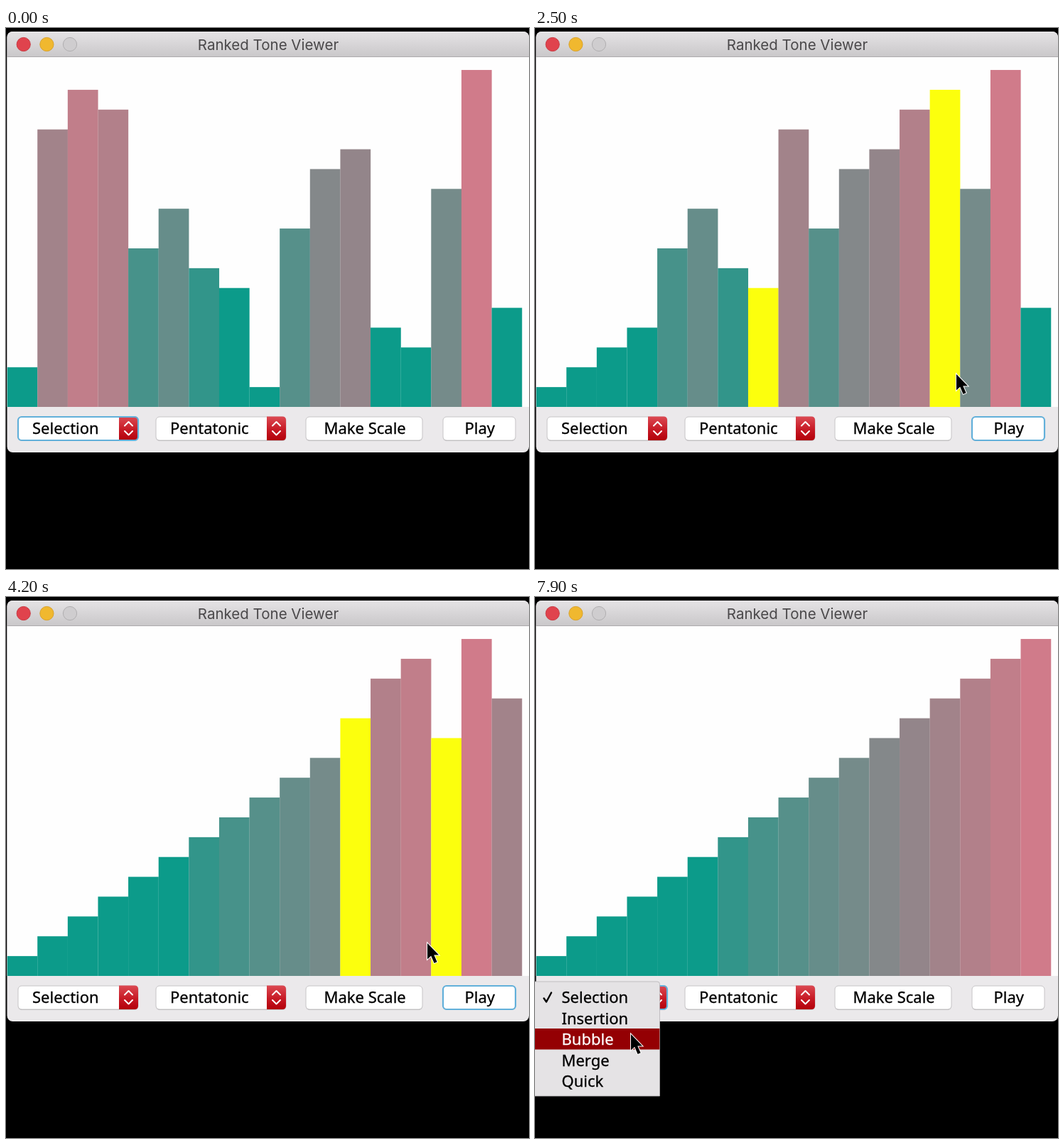
An HTML page that plays this animation: 736 by 761 pixels, repeating every 8000 ms.

```html
<!DOCTYPE html>
<html lang="en">
<head>
<meta charset="utf-8">
<title>Bars</title>
<style>
  html, body { margin: 0; width: 100%; height: 100%; overflow: hidden; background: #000; }
  svg { display: block; width: 736px; height: 761px; }
  text { font-family: "Noto Sans", "Open Sans", sans-serif; font-size: 22px; fill: #000; stroke: #000; stroke-width: .3px; }
  .title { font-family: Inter, Roboto, sans-serif; font-size: 20.5px; fill: #4a484a; stroke: none; text-anchor: middle; }
  .ring { fill: none; stroke: #62b0da; stroke-width: 2.2; }
  .line { fill: none; stroke-linecap: round; stroke-linejoin: round; }
</style>
</head>
<body>
<svg id="stage" viewBox="0 0 736 761">
  <defs>
    <linearGradient id="chrome" x2="0" y2="1">
      <stop stop-color="#e5e3e5"/><stop offset="1" stop-color="#c9c7c9"/>
    </linearGradient>
    <linearGradient id="red" x2="0" y2="1">
      <stop stop-color="#dc4a53"/><stop offset=".55" stop-color="#c71a25"/><stop offset="1" stop-color="#b3000a"/>
    </linearGradient>
    <clipPath id="frame"><rect x="1.5" y="5" width="734.5" height="592" rx="8"/></clipPath>
  </defs>
  <rect width="736" height="761"/>
  <g clip-path="url(#frame)">
    <rect y="5" width="736" height="592" fill="#ebe9eb"/>
    <rect y="5" width="736" height="36" fill="url(#chrome)"/>
    <rect y="40" width="736" height="1.2" fill="#adabad"/>
    <rect y="41" width="736" height="492" fill="#fefefe"/>
    <g id="bars" shape-rendering="geometricPrecision"></g>
  </g>
  <g stroke-width="1">
    <circle cx="24.7" cy="23" r="9.6" fill="#e0434d" stroke="#c93942"/>
    <circle cx="57.4" cy="23" r="9.6" fill="#f0b82f" stroke="#d9a128"/>
    <circle cx="90" cy="23" r="9.6" fill="#cfcdcf" stroke="#b0aeb0"/>
  </g>
  <text class="title" x="369" y="31">Ranked Tone Viewer</text>
  <g id="controls"></g>
  <g id="menu"></g>
  <path id="cursor" d="M0 0V22.5L5.2 17.8L9.6 28L13.6 26.2L9.3 16.4H16Z" fill="#000" stroke="#fff" stroke-width="2" paint-order="stroke" stroke-linejoin="miter"/>
</svg>
<script>
const LOOP = 8000, TICK = 100;
const BASE = 533, UNIT = 27.88, LEFT = 1.6, BAR = 42.62;
const START = [2, 14, 16, 15, 8, 10, 7, 6, 1, 9, 12, 13, 4, 3, 11, 17, 5];
const ITEMS = ["Selection", "Insertion", "Bubble", "Merge", "Quick"];
const ROW = 29.5, MENU_TOP = 548;

// time, x, y; eased between neighbouring points
const PATH = [
  [100, 690, 682], [300, 662, 566], [600, 655, 560], [900, 593, 487],
  [5400, 593, 487], [6200, 139, 552], [6300, 139, 552], [6500, 138, 558],
  [7400, 138, 558], [7900, 135, 615]
];

const byId = id => document.getElementById(id);

function add(parent, tag, attrs, text) {
  const el = document.createElementNS("http://www.w3.org/2000/svg", tag);
  for (const k in attrs) el.setAttribute(k, attrs[k]);
  if (text) el.textContent = text;
  parent.appendChild(el);
  return el;
}

const show = (el, on) => el.setAttribute("visibility", on ? "visible" : "hidden");

function barColor(v) {
  if (v < 7) return "rgb(12,155,138)";
  const red = v === 7 ? 50 : 208 - 15.2 * (17 - v);
  return `rgb(${Math.round(red)},${Math.round(149 - 2.6 * (v - 7))},138)`;
}

// Selection sort: one step per comparison and one per swap
function sortSteps(list) {
  const a = list.slice(), steps = [{ a: a.slice(), hot: [] }];
  const log = (...hot) => steps.push({ a: a.slice(), hot });
  for (let i = 0; i < a.length - 1; i++) {
    let min = i;
    for (let j = i + 1; j < a.length; j++) {
      log(min, j);
      if (a[j] < a[min]) min = j;
    }
    [a[i], a[min]] = [a[min], a[i]];
    log(i, min);
  }
  log();
  return steps;
}

function button(label, x, right, textX, combo) {
  const g = byId("controls"), w = right - x;
  const box = { x, y: 547, width: w, height: 33, rx: 5 };
  add(g, "rect", { ...box, y: 548, fill: "#bfbdbf" });
  add(g, "rect", { ...box, fill: "#fff", stroke: "#c6c4c6", "stroke-width": 1 });
  if (combo) {
    const l = right - 27, m = right - 13.5;
    add(g, "path", { d: `M${l} 546.5H${right - 5}q5 0 5 5V575q0 5-5 5H${l}Z`, fill: "url(#red)" });
    add(g, "path", {
      class: "line", stroke: "#fff", "stroke-width": 2,
      d: `M${m - 5.5} 559.5l5.5-5.5l5.5 5.5M${m - 5.5} 567l5.5 5.5l5.5-5.5`
    });
  }
  add(g, "text", { x: textX, y: 571 }, label);
  return add(g, "rect", { ...box, class: "ring" });
}

const steps = sortSteps(START);
const bars = START.map((v, i) =>
  add(byId("bars"), "rect", { x: LEFT + i * BAR, width: BAR + .1 }));

const sortRing = button("Selection", 17, 186, 37, true);
show(button("Pentatonic", 211, 394, 231, true), false);
show(button("Make Scale", 422, 586, 447.5, false), false);
const playRing = button("Play", 615, 717, 645.5, false);

const menu = byId("menu");
add(menu, "path", { d: "M-1 541H172q3.5 0 3.5 3.5V702H-1Z", fill: "#e5e3e5", stroke: "#b5b3b5", "stroke-width": .8 });
const mark = add(menu, "rect", { x: 0, width: 175.3, height: ROW, fill: "#940003" });
const check = add(menu, "path", { class: "line", d: "M12.5 564.5L16 569.5L23 556.5", "stroke-width": 2.4 });
const labels = ITEMS.map((s, i) => add(menu, "text", { x: 37.5, y: 571 + i * ROW }, s));

function cursorAt(t) {
  const n = PATH.findIndex(p => p[0] > t);
  if (n < 0) return PATH[PATH.length - 1].slice(1);
  const [t0, x0, y0] = PATH[Math.max(n - 1, 0)], [t1, x1, y1] = PATH[n];
  const u = Math.max(0, (t - t0) / (t1 - t0)), e = u * u * (3 - 2 * u);
  return [x0 + (x1 - x0) * e, y0 + (y1 - y0) * e];
}

function render(time) {
  const t = Math.floor(time % LOOP / TICK) * TICK;
  const n = Math.floor(22.1 + .0378 * (t - 1200));
  const { a, hot } = steps[Math.min(Math.max(n, 0), steps.length - 1)];
  a.forEach((v, i) => {
    bars[i].setAttribute("y", BASE - v * UNIT);
    bars[i].setAttribute("height", v * UNIT);
    bars[i].setAttribute("fill", hot.includes(i) ? "#fcff0d" : barColor(v));
  });

  const open = t >= 7400;
  show(playRing, t >= 600 && !open);
  show(sortRing, t < 600 || open);

  const [x, y] = cursorAt(t);
  const cursor = byId("cursor");
  show(cursor, t >= 100);
  cursor.setAttribute("transform", `translate(${x} ${y})`);

  menu.setAttribute("display", open ? "inline" : "none");
  const row = Math.max(0, Math.floor((y - MENU_TOP) / ROW));
  mark.setAttribute("y", MENU_TOP + row * ROW);
  labels.forEach((el, i) => {
    const ink = i === row ? "#fff" : "#000";
    el.style.fill = el.style.stroke = ink;
  });
  check.setAttribute("stroke", row ? "#000" : "#fff");
}

const begin = performance.now();
function loop() {
  render(performance.now() - begin);
  requestAnimationFrame(loop);
}
loop();
</script>
</body>
</html>
```
